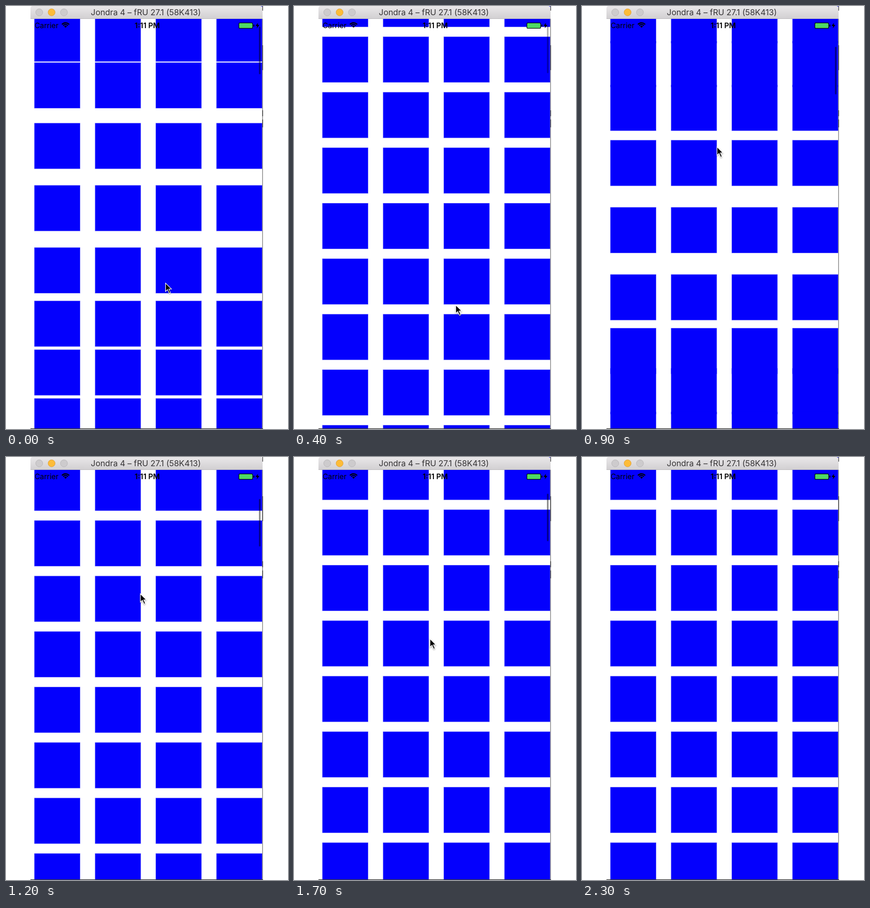
Write an HTML page with a canvas that moves like this. It is 611x917 px and loops after 2400 ms.

```html
<!DOCTYPE html>
<html lang="en">
<head>
<meta charset="utf-8">
<title>Springy grid</title>
<style>
html, body { margin: 0; width: 100%; height: 100%; overflow: hidden; background: #fff; }
canvas { display: block; }
</style>
</head>
<body>
<canvas id="stage" width="611" height="917"></canvas>
<script>
const ctx = document.getElementById('stage').getContext('2d');
const LOOP = 2400, STEP = 100;
const LEFT = 53, RIGHT = 557, BAR = 28, BOTTOM = 917;
const CELL = 99, PITCH_X = 131.5, PITCH_Y = 120.3, FIRST_ROW = 165.8;
const FLICK = 380, PEAK = 200, FADE = 300;
const FONT = 'Inter, Roboto, sans-serif';

// Flicks scroll the grid; rows lag by their distance from the touch.
const flicks = [
  { at: -200, dx: 70, dy: 420, scroll: 382, lag: -.121, touch: 619, reach: 899 },
  { at: 700, dx: -65.5, dy: -423, scroll: -410.1, lag: .21, touch: 270, reach: 829 },
  { at: 1200, dx: 3.5, dy: 97.5, scroll: 96.8, lag: -.1, touch: 345, reach: 860 },
];
const hovers = [
  { at: 200, dx: 9.5, dy: 110 },
  { at: 1800, dx: -264, dy: 507 },
];

const clamp = p => Math.max(0, Math.min(1, p));
const easeOut = p => 1 - (1 - clamp(p)) ** 4;
const smooth = p => clamp(p) ** 2 * (3 - 2 * clamp(p));
const sum = (list, f) => list.reduce((total, m) => total + f(m), 0);

const scrollAt = t => sum(flicks, m => m.scroll * easeOut((t - m.at) / FLICK));
const flickAt = t => flicks.findLast(m => m.at < t);

function pointerAt(t, axis) {
  return sum(flicks, m => m[axis] * easeOut((t - m.at) / (FLICK * .85)))
    + sum(hovers, m => m[axis] * smooth((t - m.at) / 500));
}

function rect(x, y, w, h, color) {
  ctx.fillStyle = color;
  ctx.fillRect(x, y, w, h);
}

function pill(x, y, w, h, r, color) {
  ctx.fillStyle = color;
  ctx.beginPath();
  ctx.roundRect(x, y, w, h, r);
  ctx.fill();
}

function polygon(points, color) {
  ctx.beginPath();
  points.forEach(([x, y]) => ctx.lineTo(x, y));
  ctx.closePath();
  ctx.fillStyle = color;
  ctx.fill();
}

function label(str, x, y, font, color, align) {
  ctx.font = font + ' ' + FONT;
  ctx.fillStyle = color;
  ctx.textAlign = align;
  ctx.fillText(str, x, y);
}

// A square with slightly soft edges.
function cell(x, y) {
  rect(x - .4, y - .4, CELL + .8, CELL + .8, 'rgba(4,0,253,.5)');
  rect(x + .4, y + .4, CELL - .8, CELL - .8, '#0400fd');
}

function drawGrid(t) {
  const { at, lag, touch, reach } = flickAt(t);
  const k = lag * Math.exp(-(((t - at - PEAK) / 85) ** 2));
  const first = (FIRST_ROW + scrollAt(t)) % PITCH_Y - 3 * PITCH_Y;
  for (let row = 0; row < 14; row++) {
    const rest = first + row * PITCH_Y;
    const d = Math.abs(rest + CELL / 2 - touch);
    // Rows that have just come in lag less.
    const y = rest + k * Math.max(0, Math.min(d, reach - 1.31 * d));
    for (let col = 0; col < 4; col++) cell(61.5 + col * PITCH_X, y);
  }
}

function drawIndicator(t) {
  ctx.globalAlpha = clamp(1 - (t - flickAt(t).at - 500) / FADE);
  pill(548, 87.7 - scrollAt(t) / 8.5, 3.5, 103, 1.7, 'rgba(0,0,0,.45)');
  ctx.globalAlpha = 1;
}

function drawStatus() {
  label('Carrier', 62, 48, '400 15.8px', '#000', 'left');
  label('1:11 PM', 306, 48, '600 16px', '#000', 'center');
  ctx.strokeStyle = '#000';
  ctx.lineWidth = 2.3;
  for (const r of [10.5, 6.8]) {
    ctx.beginPath();
    ctx.arc(129, 47, r, -Math.PI * .77, -Math.PI * .23);
    ctx.stroke();
  }
  ctx.beginPath();
  ctx.moveTo(129, 47);
  ctx.arc(129, 47, 4, -Math.PI * .77, -Math.PI * .23);
  ctx.fillStyle = '#000';
  ctx.fill();
  pill(504, 36, 31, 13, 2.5, '#000');
  pill(505.2, 37.2, 28.6, 10.6, 1.5, '#4fd964');
  pill(536, 40, 2, 5, 1, '#000');
  polygon([[546, 36.5], [540.5, 43.2], [544.3, 43.2], [543.3, 48.5], [549, 41], [545.3, 41]], '#000');
}

function drawTitleBar() {
  const g = ctx.createLinearGradient(0, 0, 0, BAR);
  g.addColorStop(0, '#e9e7e9');
  g.addColorStop(1, '#d1cfd1');
  pill(LEFT, 0, RIGHT - LEFT - 1, BAR, [5, 5, 0, 0], g);
  rect(LEFT, BAR - 1, RIGHT - LEFT - 1, 1, '#b9b7b9');
  ['#cdcbcd', '#fdbc38', '#cdcbcd'].forEach((fill, i) => {
    ctx.beginPath();
    ctx.arc(72 + i * 26.8, 13.7, 7.6, 0, 7);
    ctx.fillStyle = fill;
    ctx.fill();
    ctx.strokeStyle = i === 1 ? '#dfa13a' : '#b8b6b8';
    ctx.lineWidth = 1;
    ctx.stroke();
  });
  label('Jondra 4 – fRU 27.1 (58K413)', 303, 20, '400 17.6px', '#353335', 'center');
}

function drawEdges() {
  rect(555, BAR, 1.6, BOTTOM - BAR, '#8c8c8c');
  for (const [y, h] of [[0, 10], [85, 54], [226, 13], [246, 17]])
    rect(555.5, y, 1.3, h, '#333');
  rect(LEFT, 915.6, RIGHT - LEFT, 1.4, '#3c3c3c');
}

function drawPointer(t) {
  ctx.save();
  ctx.translate(276.5 + pointerAt(t, 'dx'), 188 + pointerAt(t, 'dy'));
  ctx.shadowColor = 'rgba(0,0,0,.35)';
  ctx.shadowBlur = 3;
  ctx.shadowOffsetY = 1.5;
  polygon([[0, 0], [0, 21], [4.8, 16.6], [8.3, 24.6], [12.2, 23], [8.8, 15.2], [15, 15.2]], '#fff');
  ctx.shadowColor = 'transparent';
  polygon([[1.3, 3.2], [1.3, 18], [5.2, 14.5], [9, 23], [10.7, 22.2], [7, 13.9], [12, 13.9]], '#000');
  ctx.restore();
}

function draw(t) {
  rect(0, 0, 611, 917, '#fff');
  ctx.save();
  ctx.beginPath();
  ctx.rect(LEFT, 0, RIGHT - LEFT, BOTTOM);
  ctx.clip();
  drawGrid(t);
  drawIndicator(t);
  drawStatus();
  drawTitleBar();
  drawEdges();
  drawPointer(t);
  ctx.restore();
}

const start = performance.now();
function tick() {
  const t = (performance.now() - start) % LOOP;
  draw(Math.floor(t / STEP) * STEP);
  requestAnimationFrame(tick);
}
tick();
</script>
</body>
</html>
```
